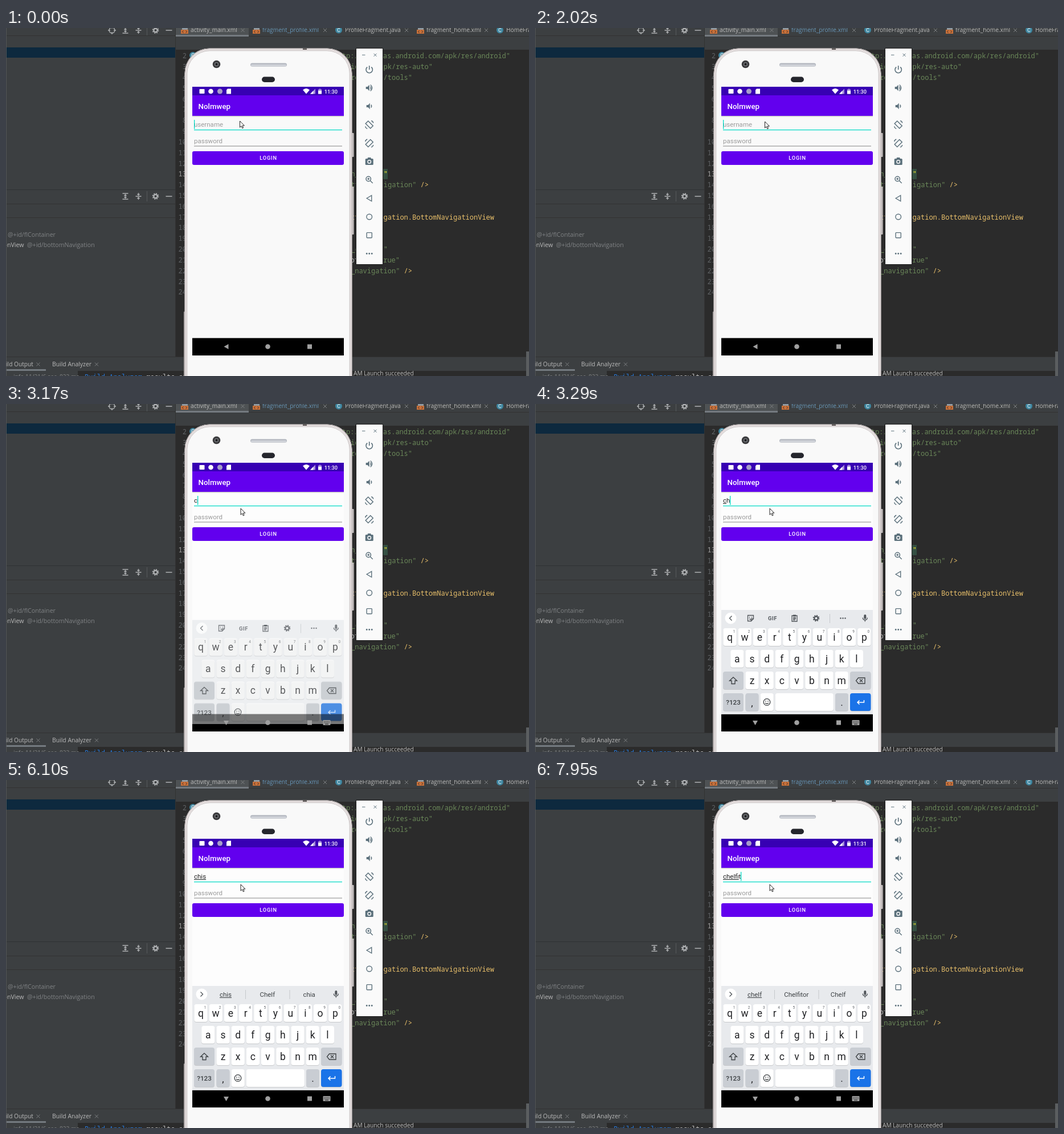
Animation of 918 by 610 pixels, one loop 8000 ms. Source, as an HTML page with a canvas:

```html
<!DOCTYPE html>
<html lang="en">
<head>
<meta charset="utf-8">
<title>Login screen in a phone emulator</title>
<style>
  html, body { margin: 0; width: 100%; height: 100%; overflow: hidden; background: #2b2b2b; }
  canvas { display: block; }
</style>
</head>
<body>
<canvas width="918" height="610"></canvas>
<script>
const c = document.querySelector('canvas').getContext('2d');
const LOOP = 8000;
const UI = '10.2px "Open Sans", sans-serif';
const TREE = '10.65px "Open Sans", sans-serif';
const MONO = '12px "Noto Sans Mono", monospace';
const roboto = (size, weight = 400) => `${weight} ${size}px Roboto, sans-serif`;

// Each step overrides part of the state from its time on.
const steps = [
  [0, { text: '', lined: 0, caret: true, mouse: [410.5, 163], clock: '11:30', nav: false, keyboard: null, words: null }],
  [500, { caret: false }],
  [1000, { caret: true }],
  [1520, { caret: false, mouse: [403.5, 164] }],
  [2020, { caret: true }],
  [2300, { mouse: [412, 183] }],
  [2550, { caret: false }],
  [2800, { nav: true }],
  [3170, { text: 'c', caret: true, keyboard: 17.5 }],
  [3290, { text: 'ch', lined: 1, keyboard: 0 }],
  [3530, { lined: 2 }],
  [3780, { words: ['ch', 'check', 'child'] }],
  [4030, { caret: false }],
  [4410, { text: 'chi', caret: true }],
  [4660, { lined: 3, words: ['chi', 'chicken', 'Chinese'] }],
  [5070, { caret: false }],
  [5320, { text: 'chis', caret: true }],
  [5570, { lined: 4, words: ['chis', 'Chelf', 'chia'] }],
  [6100, { caret: false }],
  [6350, { clock: '11:31' }],
  [6470, { text: 'chi', lined: 3, caret: true }],
  [6610, { text: 'ch', lined: 2, words: ['chi', 'chicken', 'Chinese'] }],
  [6860, { words: ['ch', 'check', 'child'] }],
  [7230, { text: 'che' }],
  [7350, { text: 'chel', lined: 3 }],
  [7470, { lined: 4, words: ['chel', 'Chelf', 'chest'] }],
  [7590, { text: 'chelf' }],
  [7710, { lined: 5, words: ['chelf', 'Chelfitor', 'Chelf'] }],
  [7830, { text: 'chelfi' }],
  [7950, { text: 'chelfit', lined: 6 }],
];

function box(x, y, w, h, color, r = 0) {
  c.fillStyle = color;
  c.beginPath();
  c.roundRect(x, y, w, h, r);
  c.fill();
}
function frame(x, y, w, h, color, r = 0, width = 1.2) {
  c.strokeStyle = color;
  c.lineWidth = width;
  c.beginPath();
  c.roundRect(x, y, w, h, r);
  c.stroke();
}
function disc(x, y, r, color) {
  c.fillStyle = color;
  c.beginPath();
  c.arc(x, y, r, 0, 7);
  c.fill();
}
function ring(x, y, r, color, width = 1.3, dash = []) {
  c.strokeStyle = color;
  c.lineWidth = width;
  c.setLineDash(dash);
  c.beginPath();
  c.arc(x, y, r, 0, Math.PI * 2);
  c.stroke();
  c.setLineDash([]);
}
function at(x, y, draw) {
  c.save();
  c.translate(x, y);
  draw();
  c.restore();
}
function line(d, x, y, color, width = 1.3) {
  at(x, y, () => {
    c.strokeStyle = color;
    c.lineWidth = width;
    c.stroke(new Path2D(d));
  });
}
function shape(d, x, y, color) {
  at(x, y, () => {
    c.fillStyle = color;
    c.fill(new Path2D(d));
  });
}
function label(text, x, y, font, color, align = 'left') {
  c.font = font;
  c.fillStyle = color;
  c.textAlign = align;
  c.fillText(text, x, y);
}
function gear(x, y, color) {
  ring(x, y, 3.2, color, 2.2);
  ring(x, y, 4.9, color, 1.8, [2, 1.85]);
}
const cross = (x, y, color, r = 3) => line(`M${-r} ${-r}L${r} ${r}M${r} ${-r}L${-r} ${r}`, x, y, color, 1);

function panelTools(y) {
  const color = '#afb1b3';
  line('M-5-5H5M-5 5H5M0-3V3M-2-1L0-3L2-1M-2 1L0 3L2 1', 209.5, y, color);
  line('M-5 0H5M0-6V-2M-2-4L0-2L2-4M0 6V2M-2 4L0 2L2 4', 232.5, y, color);
  box(247, y - 9, 1, 18, '#55585a');
  gear(262.5, y, color);
  box(280.5, y - .7, 11, 1.5, color);
}

function classIcon(x, y) {
  disc(x, y, 6, '#3e86a0');
  label('C', x, y + 3.3, roboto(9, 500), '#d5e6ec', 'center');
}

function tab(x, name, close, color) {
  if (name.endsWith('.xml')) {
    box(x - 15, -4, 10, 9, '#8f989f');
    box(x - 17, 3, 13, 7, '#c7703a');
    line('M-2-2L-4 0L-2 2M2-2L4 0L2 2', x - 10.5, 6.5, '#3c2a20', 1);
  } else classIcon(x - 11, 3.5);
  label(name, x, 7, UI, color);
  cross(close, 4, '#7c7f81');
}

const rowY = row => Math.round(49.3 + (row - 2) * 18.82);

// Draws coloured code that ends at a given x.
function code(row, end, ...parts) {
  c.font = MONO;
  let x = end - c.measureText(parts.map(p => p[0]).join('')).width;
  for (const [text, color] of parts) {
    label(text, x, rowY(row) + 4, MONO, color);
    x += c.measureText(text).width;
  }
}

function drawEditor() {
  box(0, 0, 918, 610, '#3c3f41');
  box(298, 38, 620, 538, '#2b2b2b');

  box(298, 0, 128, 15, '#4e5254');
  box(298, 12, 128, 3, '#747a80');
  box(426, 14, 492, 1, '#323232');
  tab(324, 'activity_main.xml', 415.5, '#bbbbbb');
  tab(450, 'fragment_profile.xml', 560, '#6897bb');
  tab(595, 'ProfileFragment.java', 703, '#bbbbbb');
  tab(738, 'fragment_home.xml', 843, '#bbbbbb');
  tab(878, 'HomeFragment.java', 990, '#bbbbbb');

  for (let row = 2; row <= 24; row++)
    label(row, 317, rowY(row) + 4, MONO, row === 13 ? '#a4a3a3' : '#606366', 'right');
  classIcon(328, 48);

  const green = '#6a8759', gold = '#e8bf6a', plain = '#bababa';
  code(2, 885, ['http://schemas.android.com/apk/res/android"', green]);
  code(3, 749, ['http://schemas.android.com/apk/res-auto"', green]);
  code(4, 713, ['http://schemas.android.com/tools"', green]);
  box(662, rowY(13) - 9, 8, 18, '#344f42');
  code(13, 670, ['match_parent', green], ['"', '#ffef28']);
  code(14, 742, ['bottom_navigation"', green], [' />', gold]);
  code(17, 857, ['bottomnavigation.BottomNavigationView', gold]);
  code(20, 670, ['wrap_content"', green]);
  code(21, 691, ['Bottom=', plain], ['"true"', green]);
  code(22, 713, ['bottom_navigation"', green], [' />', gold]);
}

function drawPanels() {
  box(0, 13, 298, 1, '#323232');
  box(0, 34, 298, 18, '#0d293e');
  box(0, 283, 298, 1, '#2f3234');
  box(0, 308, 298, 1, '#323232');
  box(0, 332, 298, 1, '#323232');
  box(297, 0, 1, 577, '#323232');
  panelTools(4);
  ring(186, 4, 5, '#afb1b3');
  line('M-7 0H-3M3 0H7M0-3V-7M0 3V7', 186, 4, '#afb1b3');
  panelTools(295);
  label('@+id/flContainer', 3, 366, TREE, '#808385');
  label('onView', 31.5, 384, TREE, '#bbbbbb', 'right');
  label('@+id/bottomNavigation', 37, 384, TREE, '#808385');

  box(0, 576, 918, 34, '#3c3f41');
  box(0, 576, 918, 1, '#323232');
  box(0, 601, 918, 9, '#2b2b2b');
  box(0, 601, 126, 9, '#3c3f41');
  box(0, 598, 70, 3, '#747a80');
  label('ild Output', 0, 593, UI, '#bbbbbb');
  cross(56.5, 589.5, '#7c7f81');
  label('Build Analyzer', 81, 593, '10.4px "Open Sans", sans-serif', '#bbbbbb');
  cross(159, 589.5, '#7c7f81');
  label('info 11/21/6 sec, 823 ms', 13, 615, UI, '#808385');
  label('Build Analyzer', 138, 616, MONO, '#287bde');
  label('results available', 246, 616, MONO, '#bbbbbb');
  label('AM', 610, 609, UI, '#bbbbbb');
  label('Launch succeeded', 628, 609, UI, '#bbbbbb');
  box(913, 567, 5, 43, '#5b5e60');
  box(0, 0, 1, 610, '#515456');
}

function drawPhoneBody() {
  box(606, 184, 4.5, 42, '#c9c2c2', 1);
  box(606, 278, 4.5, 84, '#c9c2c2', 1);
  box(312, 497, 4, 130, '#aaa3a3', 1);
  box(313.5, 35.5, 294, 650, '#f9f9f9', 44);
  frame(314, 36, 293, 650, '#958c8c', 43.5, 1);
  frame(315.8, 37.8, 289.4, 650, '#e2dbdb', 42, 2.6);
  frame(317.8, 39.8, 285.4, 650, '#b9b0b0', 40, .8);
  box(521, 35.5, 7, 2.5, '#55504f');
  disc(369.5, 63.5, 6.8, '#3a3a3c');
  disc(369.5, 63.5, 3.8, '#6a6c70');
  disc(369.5, 63.5, 2, '#1b1b1d');
  box(429, 61.5, 64, 6, '#b4b8c0', 3);
  box(430, 64, 62, 2.5, '#d5d8de', 1.2);
  box(449, 85.5, 23, 9.5, '#25262d', 4.7);
}

function drawApp({ text, lined, caret, clock, keyboard }) {
  box(327, 103, 266, 471, keyboard === null ? '#f9f9f9' : '#fdfdfd');
  box(327, 154, 266, 1.5, '#d0d0d0');
  box(327, 103, 266, 15, '#3700b3');
  box(327, 118, 266, 36, '#6200ee');

  box(339.5, 107, 9, 8, '#ffffff', 1);
  disc(359.5, 111, 4.3, '#ffffff');
  disc(375.5, 111, 4.6, '#a79cc9');
  shape('M-2-4.5H4V4.5H-4V-2.5Z', 391, 111, '#ffffff');
  shape('M-6-2Q0-7 6-2L0 5Z', 527, 110.5, '#ffffff');
  shape('M-4.5 4.5H4.5V-4.5Z', 538.5, 111, '#a78fdc');
  shape('M-4.5 4.5H1V-1Z', 538.5, 111, '#ffffff');
  shape('M-3-3.5H-1V-4.5H1V-3.5H3V4.5H-3Z', 551, 111, '#a78fdc');
  box(548, 110, 6, 5.5, '#ffffff');
  label(clock, 582, 114.5, roboto(9.2, 500), '#ffffff', 'right');
  label('Nolmwep', 337.5, 141.5, roboto(13.3, 500), '#ffffff');

  const font = roboto(11.5);
  label(text || 'username', 330, 173, font, text ? '#222222' : '#9b9b9b');
  if (lined) box(330, 174, c.measureText(text.slice(0, lined)).width, 1, '#222222');
  if (caret) box(330 + Math.floor(c.measureText(text).width), 161, 1.3, 16, '#03dac5');
  box(330, 178, 260, 1.3, '#03dac5');
  label('password', 330, 202, font, '#9b9b9b');
  box(330, 206.6, 260, 1, '#858585');

  box(327, 216, 266, 24, '#6200ee', 3);
  c.letterSpacing = '0.8px';
  label('LOGIN', 460.5, 231.3, roboto(9.2, 500), '#ffffff', 'center');
  c.letterSpacing = '0px';
}

function key(x, y, w, color = '#ffffff') {
  box(x, y + 1, w, 31, 'rgba(0,0,0,.14)', 4);
  box(x, y, w, 31, color, 4);
}

function letterRow(letters, x, y) {
  [...letters].forEach((letter, i) => {
    const mid = x + i * 26.2;
    key(mid - 11.6, y, 23.2);
    label(letter, mid, y + 21.5, roboto(17.5), '#202124', 'center');
    if (letters.length === 10)
      label((i + 1) % 10, mid + 7.5, y + 8, roboto(6.5), '#5f6368', 'center');
  });
}

function drawStrip(words) {
  const ink = '#50555a';
  disc(343.5, 375.5, 10, '#ffffff');
  line(words ? 'M-2-4L2 0L-2 4' : 'M2-4L-2 0L2 4', 343.5, 375.5, ink, 1.4);
  if (words) {
    words.forEach((word, i) => {
      const mid = 385.5 + i * 73.3;
      label(word, mid, 380, roboto(11.5), '#3c4043', 'center');
      if (!i) {
        const w = c.measureText(word).width;
        box(mid - w / 2, 381, w, 1, '#3c4043');
      }
    });
    box(420, 368, 1, 16, '#c5c8cc');
    box(497.5, 368, 1, 16, '#c5c8cc');
  } else {
    line('M-5-5H5V1L1 5H-5ZM5 1H1V5M-2-2.5V-1M2-2.5V-1M-2.5 1Q0 3 1.5 1', 378.5, 375.5, ink);
    c.letterSpacing = '0.5px';
    label('GIF', 417, 379, roboto(9.5, 700), ink, 'center');
    c.letterSpacing = '0px';
    line('M-4.5-4.5H4.5V5.5H-4.5ZM-2.5-1H2.5M-2.5 1H2.5M-2.5 3H1', 455.5, 375.5, ink);
    box(453, 369.5, 5, 3, ink);
    gear(493.5, 375.5, ink);
    box(517, 368, 1, 16, '#c5c8cc');
    for (const x of [536.5, 540.5, 544.5]) disc(x, 375.5, 1.2, ink);
  }
  box(577.3, 369, 4, 8, ink, 2);
  line('M-4-1Q-4 3 0 3Q4 3 4-1M0 3V6', 579.3, 375.5, ink);
}

function drawKeyboard(words) {
  const grey = '#c9cdd3', ink = '#3c4043';
  box(327, 361, 266, 182.5, '#e8eaed');
  drawStrip(words);
  letterRow('qwertyuiop', 342, 393);
  letterRow('asdfghjkl', 354.8, 431);
  key(330, 469, 36, grey);
  line('M0-6L6.5 0H3V5.5H-3V0H-6.5Z', 348, 485, ink);
  letterRow('zxcvbnm', 381, 469);
  key(553, 469, 36.5, grey);
  line('M-8 0L-4-5H7.5V5H-4ZM-1.5-2.5L3.5 2.5M3.5-2.5L-1.5 2.5', 571.5, 485, ink);

  key(330, 507, 36, grey);
  label('?123', 348, 527, roboto(11.7, 500), ink, 'center');
  key(369.5, 507, 23, grey);
  label(',', 381, 529.5, roboto(17), '#202124', 'center');
  key(395.5, 507, 23.2);
  ring(407, 522.5, 5.8, ink);
  line('M-2-2.5V-.7M2-2.5V-.7M-3 1.5Q0 4.5 3 1.5', 407, 522.5, ink);
  key(421.8, 507, 102);
  key(527, 507, 23, grey);
  label('.', 538.5, 528.5, roboto(17), '#202124', 'center');
  key(553, 507, 36.5, '#1a73e8');
  line('M6-3V1H-5M-2-2.5L-5.5 1L-2 4.5', 571.5, 522, '#ffffff', 1.5);
}

function drawScreenBottom({ nav, keyboard, words }) {
  box(327, 543.5, 266, 30.5, '#000000');
  if (keyboard !== null) {
    at(0, keyboard, () => {
      box(327, 361, 266, 182.5, '#fdfdfd');
      if (keyboard) c.globalAlpha = .72;
      drawKeyboard(words);
    });
    box(327, 543.5, 266, keyboard, 'rgba(0,0,0,.5)');
  }
  const color = '#a0a0a0';
  shape(nav ? 'M-4.5-3.5H4.5L0 4.5Z' : 'M4-4.5V4.5L-4 0Z', 386.5, 558.5, color);
  disc(459.5, 558.5, 4.3, color);
  box(529, 554.5, 8, 8, color);
  if (nav) {
    box(556.5, 554, 13, 9, color, 1);
    for (let i = 0; i < 4; i++) {
      box(558.2 + i * 2.7, 555.8, 1.3, 1.3, '#222222');
      box(558.2 + i * 2.7, 558, 1.3, 1.3, '#222222');
    }
    box(560, 560.6, 6, 1.1, '#222222');
  }
}

function drawToolbar() {
  const color = '#5c717c', x = 637.7;
  box(614, 35, 48, 380, '#1d1d1d');
  box(615, 36, 46, 378, '#fafafa');
  box(625, 46.8, 5.5, 1, color);
  cross(648, 47.3, color, 2.5);
  line('M-3.5-4.5A5.7 5.7 0 1 0 3.5-4.5M0-7V0', x, 73, color, 1.6);
  const speaker = 'M-6-2H-3L0-5.5V5.5L-3 2H-6Z';
  shape(speaker, x, 105, color);
  line('M2-2.5Q4 0 2 2.5M2-5.5Q8 0 2 5.5', x, 105, color, 1.4);
  shape(speaker, x + 1, 137, color);
  line('M2-2.5Q4 0 2 2.5', x + 1, 137, color, 1.4);
  for (const [y, flip] of [[169.5, 1], [202, -1]])
    at(x, y, () => {
      c.scale(flip, 1);
      line('M-2-6.5L6.5 2L2 6.5L-6.5-2ZM3.5-7Q6.5-6 7-3M-3.5 7Q-6.5 6-7 3', 0, 0, color, 1.5);
    });
  box(x - 7, 229, 14, 11, color, 1.5);
  box(x - 3, 227, 6, 3, color, 1);
  ring(x, 234.5, 2.8, '#fafafa', 1.4);
  ring(x - 1.5, 264.5, 4.2, color, 1.5);
  line('M1.5 1.5L6 6M-3.5-1.5H.5M-1.5-3.5V.5', x, 266, color, 1.4);
  line('M4-5V5L-4.5 0Z', x, 298.5, color, 1.4);
  ring(x, 331, 4.8, color, 1.4);
  frame(x - 4.6, 358.6, 9.2, 9.2, color, 1, 1.4);
  for (const dx of [-4.5, 0, 4.5]) disc(x + dx, 395.5, 1.4, color);
}

function drawMouse([x, y]) {
  const arrow = 'M0 0V11.2L2.6 8.8L4.3 12.8L6.1 12L4.4 8.1H7.9Z';
  shape(arrow, x, y, '#ffffff');
  line(arrow, x, y, '#222222', 1);
}

function draw() {
  const now = performance.now() % LOOP;
  const state = Object.assign({}, ...steps.filter(([time]) => time <= now).map(step => step[1]));
  drawEditor();
  drawPanels();
  drawPhoneBody();
  drawApp(state);
  drawScreenBottom(state);
  drawToolbar();
  drawMouse(state.mouse);
  requestAnimationFrame(draw);
}
draw();
</script>
</body>
</html>
```
